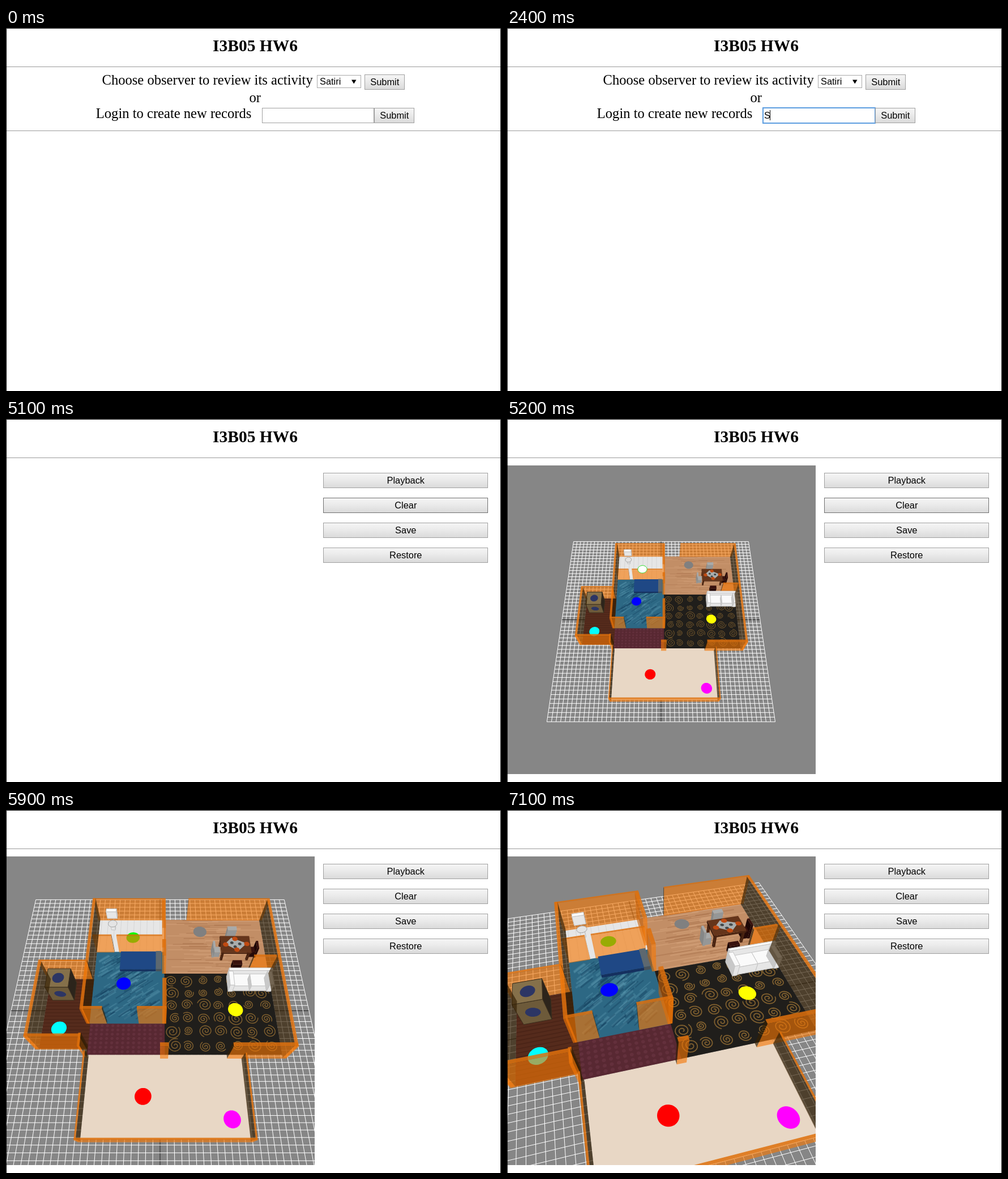
Animation, 874 px wide and 641 px high, one loop 8000 ms. Source, as an HTML page with a canvas:

```html
<!DOCTYPE html>
<html lang="en">
<head>
<meta charset="utf-8">
<title>I3B05 HW6</title>
<style>
html, body { margin: 0; width: 100%; height: 100%; overflow: hidden; background: #fff; }
svg { position: absolute; left: 0; top: 0; }
canvas { position: absolute; left: 1px; top: 82px; }
text { font: 16.4px "Liberation Sans", Arial, sans-serif; }
.serif { font: 24.6px "Liberation Serif", "Times New Roman", serif; }
.title { font-size: 29.5px; font-weight: bold; }
.mid { text-anchor: middle; }
</style>
</head>
<body>
<svg id="page" width="874" height="641">
  <defs>
    <linearGradient id="face" x2="0" y2="1">
      <stop offset="0" stop-color="#f5f5f5"/><stop offset=".4" stop-color="#ececec"/><stop offset="1" stop-color="#dadada"/>
    </linearGradient>
  </defs>
  <path d="M.5 641V.5H873.5V641" fill="none" stroke="#000"/>
  <path d="M1 68.5H873" stroke="#9a9a9a"/>
  <text class="serif title mid" x="440" y="41">I3B05 HW6</text>
  <g id="login">
    <path d="M1 181.5H873" stroke="#9a9a9a"/>
    <text class="serif" x="169.5" y="100">Choose observer to review its activity</text>
    <text class="serif" x="429.5" y="131">or</text>
    <text class="serif" x="158.8" y="159">Login to create new records</text>
    <rect x="549.5" y="83.5" width="77" height="22" fill="#fff" stroke="#a9a9a9"/>
    <text x="554" y="100">Satiri</text>
    <path d="M610 91.5H618.5L614.2 98.5Z"/>
    <rect x="452.5" y="141.5" width="197" height="26" fill="#fff" stroke="#a0a0a0"/>
    <rect id="focus" x="452" y="141" width="198" height="27" fill="#fff" stroke="#5c9de0" stroke-width="2"/>
    <text id="typed" x="454" y="160"></text>
    <rect id="caret" y="145" width="1" height="18"/>
  </g>
  <g id="panel"></g>
</svg>
<canvas id="view" width="544" height="545"></canvas>
<script>
const $ = id => document.getElementById(id);
const button = (id, x, y, w, label) =>
  `<rect id="${id}" x="${x}" y="${y}" width="${w}" height="26" fill="url(#face)" stroke="#a0a0a0"/>
   <text class="mid" x="${x + w / 2 + .3}" y="${y + 18}">${label}</text>`;
$('login').innerHTML += button('review', 633.5, 82.5, 70, 'Submit') + button('send', 650.5, 141.5, 70, 'Submit');
$('panel').innerHTML = ['Playback', 'Clear', 'Save', 'Restore']
  .map((s, i) => button(s, 560.5, 95.5 + i * 44, 290, s)).join('');

// time, typed text, caret visible
const typing = [[1500, 'S', 1], [1900, 'S', 0], [2400, 'S', 1], [2800, 'Sn', 1], [3200, 'Sn', 0], [3300, 'S', 0],
  [3500, 'Si', 1], [3700, 'Sin', 1], [3900, 'Sind', 1], [4000, 'Sinde', 1], [4100, 'Sinder', 1], [4600, 'Sinder', 0]];
// time, camera distance, azimuth, elevation
const views = [[5200, 67.6, 0, 63.4], [5700, 57.9, 0, 63.4], [5900, 44.95, 0, 63.4],
  [6100, 36.7, 0, 63.4], [7100, 36.7, 13.3, 54]];

const c = $('view').getContext('2d');
const FOCAL = 591;
let dist, ca, sa, ce, se, px, seed;

const rnd = () => (seed = (seed * 16807) % 2147483647) / 2147483647;
const between = (a, b) => a + (b - a) * rnd();
const nearness = (x, z) => z * ca - x * sa;

function project([x, z, h = 0]) {
  const n = nearness(x, z), k = FOCAL / (dist - n * ce - h * se);
  return [271 + (x * ca + z * sa) * k, 272.5 + (n * se - h * ce) * k];
}
function trace(pts) {
  c.beginPath();
  pts.forEach(p => c.lineTo(...project(p)));
}
function line(pts, color, width = 1) {
  trace(pts);
  c.strokeStyle = color;
  c.lineWidth = width;
  c.stroke();
}
function poly(pts, fill, edge) {
  trace(pts);
  c.closePath();
  c.fillStyle = fill;
  c.fill();
  if (edge) { c.strokeStyle = edge; c.lineWidth = 1; c.stroke(); }
}
const ring = f => Array.from({ length: 40 }, (_, i) => f(Math.cos(i * Math.PI / 20), Math.sin(i * Math.PI / 20)));
const disc = (x, z, fill, r = 1, h = 0, edge) => poly(ring((u, v) => [x + r * u, z + r * v, h]), fill, edge);
const floor = (x0, x1, z0, z1, fill) => poly([[x0, z0], [x1, z0], [x1, z1], [x0, z1]], fill);

function drawGround() {
  for (let i = -25; i <= 25; i++) {
    const p = i * .8;
    line([[p, -20], [p, 20]], i ? '#fff' : '#222');
    line([[-20, p], [20, p]], i ? '#fff' : '#222');
  }
  floor(-9, 10.3, 6.2, 16.2, '#e8d7c5');

  floor(-9.3, .7, 1.8, 6.2, '#582832');
  for (let x = -9; x < .5; x += .7)
    for (let z = 2.2; z < 6; z += .6) disc(x, z, '#63303c', .2);

  floor(-15.4, -9.2, -5, 5.4, '#552b1c');
  for (let z = -4.7; z < 5.3; z += .5) line([[-15.4, z], [-9.2, z]], 'rgba(35,12,5,.2)', px * .12);

  floor(-9.3, .6, -15.8, -9.6, '#e6e6e6');
  for (let x = -9; x < .6; x += 1) line([[x, -15.8], [x, -9.6]], '#d6d6d6');

  floor(-9.3, .6, -9.7, 1.9, '#2d6884');
  for (let i = 0; i < 150; i++) {
    const x = between(-8.2, -.8), z = between(-9.2, .6), s = between(.4, 1.1);
    line([[x + s, z - s * .4], [x, z + s * .3], [x - s * .9, z + s]],
      i % 2 ? 'rgba(105,165,185,.28)' : 'rgba(12,48,78,.28)', px * between(.1, .3));
  }

  floor(.6, 15.4, -15.8, -5.9, '#c28e66');
  for (let z = -15.7; z < -6; z += .16) {
    const x = between(.7, 9);
    line([[x, z], [Math.min(15.4, x + between(2, 8)), z]],
      rnd() < .5 ? 'rgba(130,70,35,.2)' : 'rgba(232,185,142,.25)', px * .13);
  }

  floor(.6, 15.4, -5.9, 6.2, '#201e1b');
  for (let i = 0; i < 7; i++) for (let j = 0; j < 6; j++) {
    const x = 1.75 + i * 2.08 + between(-.25, .25), z = -4.8 + j * 1.96 + between(-.2, .2);
    const turn = (i + j) % 2 ? 1 : -1, start = rnd() * 6.3, size = between(.6, 1.05), pts = [];
    for (let a = 0; a < 15; a += .35) {
      const r = size * (.08 + a / 16.3);
      pts.push([x + r * Math.cos(start + a * turn), z + r * Math.sin(start + a * turn)]);
    }
    line(pts, '#80602f', px * .11);
  }
}

const ORANGE = 'rgba(245,120,5,.62)', RIM = 'rgba(222,112,12,.85)', DARK = 'rgba(52,31,4,.68)', AMBER = 'rgba(200,95,5,.6)';
const box = (x0, x1, z0, z1, h, top, front, side, opt = {}) => ({ x0, x1, z0, z1, h, top, front, side, ...opt });
const wall = (x0, x1, z0, z1, h = 4.3, side = DARK) => box(x0, x1, z0, z1, h, RIM, ORANGE, side);
const white = (x0, x1, z0, z1, h, opt) => box(x0, x1, z0, z1, h, '#fafafa', '#e6e6e6', '#c8c8c8', { edge: '#c4c4c4', ...opt });
const wood = (x0, x1, z0, z1, h, opt) => box(x0, x1, z0, z1, h, '#65351b', '#4a2411', '#3a1b0d', opt);
const grey = (...a) => box(...a, '#a8aaaa', '#959797', '#858787');
const black = (...a) => box(...a, '#38120e', '#260a08', '#1d0706');

function dishes() {
  poly([[9.2, -9.6, 2], [10.2, -10.7, 2], [12.3, -9.7, 2], [11, -8.4, 2]], '#a9adad');
  for (const [x, z] of [[10.2, -9.8], [11.3, -9.6], [10.6, -9.1]]) disc(x, z, '#42484a', .24, 2);
  for (const [x, z] of [[10.7, -10.5], [9.3, -9.5], [12.3, -9.6], [10.8, -8.6]]) disc(x, z, '#c04a12', .38, 2);
}
function emblems() {
  disc(-13.15, -3, '#2c3564', .75, 3.5);
  poly(ring((u, v) => [-13.15 + .75 * u, -1.6, 1.75 + .75 * v]), '#2c3564');
}

const solids = [
  wall(-9.6, .8, -16, -15.7), wall(4.1, 15.8, -16, -15.7),
  wall(-9.7, -9.3, -16, 1.9),
  wall(.3, .8, -15.7, -10.5, 4.3, AMBER), wall(.3, .8, -8.6, -5.9, 4.3, AMBER), wall(.3, .8, -2.5, 1.9, 4.3, AMBER),
  wall(-9.3, -6.7, -9.9, -9.6, 3.7), wall(-6, .3, -9.9, -9.6, 3.7),
  wall(-9.5, -7, 1.5, 1.9), wall(-2.8, .8, 1.5, 1.9),
  wall(15.4, 15.8, -15.7, -6), wall(15.4, 15.8, -6, 6.6), wall(12.4, 15.4, -6.3, -5.9, 4),
  wall(0, 1, 6.2, 6.7), wall(8.4, 15.8, 6.2, 6.7),
  wall(-15.8, -9.5, -5.3, -5), wall(-15.8, -15.4, -5, 5.4), wall(-15.8, -9.3, 5.1, 5.5),
  wall(-9.5, -9.2, 5, 6.6),
  wall(-9.2, -9, 6.4, 16.4, 2.2), wall(10.2, 10.4, 6.7, 16.4, 2.2), wall(-9.2, 10.4, 16.25, 16.5, 2.2),

  white(-8, -6.5, -15.8, -15.2, 2.4, { base: 1 }),
  white(-7.4, -6.8, -14.3, -13.8, 1.1, { after: () => disc(-7.1, -14, '#e4e4e4', .65, 1.2, '#a0a0a0') }),
  box(-5.7, -.6, -9.4, -6.3, .5, '#1f4885', '#15305f', '#15305f'),
  box(-.6, .2, -9.4, -6.3, .6, '#5d6870', '#48525a', '#48525a'),

  grey(9.8, 11.1, -12.6, -11.9, 2.2),
  grey(7.5, 7.8, -10, -8.7, 2.2), grey(7.8, 8.6, -9.8, -8.8, 1.1),
  wood(8.7, 9, -10.9, -10.6, 1.8), wood(12.4, 12.7, -10.9, -10.6, 1.8),
  wood(8.7, 9, -8.5, -8.2, 1.8), wood(12.4, 12.7, -8.5, -8.2, 1.8),
  wood(8.6, 12.8, -11, -8.1, 2, { base: 1.7, bias: 2, after: dishes }),
  black(12.8, 13.6, -9.8, -8.8, 1.1), black(13.6, 13.9, -10, -8.7, 2.2),
  black(10.2, 11.5, -7.3, -6.6, 1.3),

  white(9.4, 15.3, -5.4, -5, 2.2),
  white(10, 12.35, -5, -3.1, 1.3), white(12.35, 14.7, -5, -3.1, 1.3),
  white(9.4, 10, -5.2, -3, 1.7, { bias: 1 }), white(14.7, 15.3, -5.2, -3, 1.7, { bias: 1 }),

  box(-14.65, -11.7, -4.4, -1.6, 3.5, '#85704a', '#6d5a3a', '#2c241b', { edge: '#3b2f1e', after: emblems })
];

function drawBox({ x0, x1, z0, z1, h, top, front, side, base = 0, edge, after }) {
  const camX = -dist * ce * sa;
  const x = camX > x1 ? x1 : camX < x0 ? x0 : null;
  if (x !== null) poly([[x, z0, base], [x, z1, base], [x, z1, h], [x, z0, h]], side, edge);
  poly([[x0, z1, base], [x1, z1, base], [x1, z1, h], [x0, z1, h]], front, edge);
  poly([[x0, z0, h], [x1, z0, h], [x1, z1, h], [x0, z1, h]], top, edge);
  if (after) after();
}

function drawHouse([, d, azimuth, elevation]) {
  const a = azimuth * Math.PI / 180, e = elevation * Math.PI / 180;
  dist = d; px = FOCAL / d; seed = 4242;
  ca = Math.cos(a); sa = Math.sin(a); ce = Math.cos(e); se = Math.sin(e);
  c.fillStyle = '#868686';
  c.fillRect(0, 0, 544, 545);
  drawGround();
  disc(-2.03, 11.4, '#f00');
  disc(8.34, 14.02, '#f0f');
  disc(-5.1, -4.27, '#00f');
  disc(10.15, -.17, '#ff0');
  disc(-13.23, 2.59, '#0ff');
  disc(-4.07, -12.34, '#0f0');
  disc(6.07, -13.46, '#808080');
  const order = o => nearness((o.x0 + o.x1) / 2, (o.z0 + o.z1) / 2) + (o.bias || 0);
  [...solids].sort((p, q) => order(p) - order(q)).forEach(drawBox);
  if (d > 60) disc(-4.07, -12.34, '#fff', 1, 0, '#3d3');
}

const latest = (list, t) => list.filter(s => s[0] <= t).pop();
const show = (id, on) => $(id).style.display = on ? '' : 'none';
let drawn;

function frame() {
  const t = performance.now() % 8000;
  const [, text, caret] = latest(typing, t) || [0, '', 0];
  show('login', t < 5100);
  show('panel', t >= 5100);
  show('view', t >= 5200);
  show('focus', t >= 1500);
  show('caret', caret);
  $('typed').textContent = text;
  if (caret && t < 5100) $('caret').setAttribute('x', Math.floor(454 + $('typed').getComputedTextLength()));
  $('send').setAttribute('stroke', t >= 4900 ? '#707070' : '#a0a0a0');
  $('Clear').setAttribute('stroke', t < 5400 ? '#707070' : '#a0a0a0');
  const view = latest(views, t);
  if (view && view !== drawn) drawHouse(drawn = view);
  requestAnimationFrame(frame);
}
frame();
</script>
</body>
</html>
```
